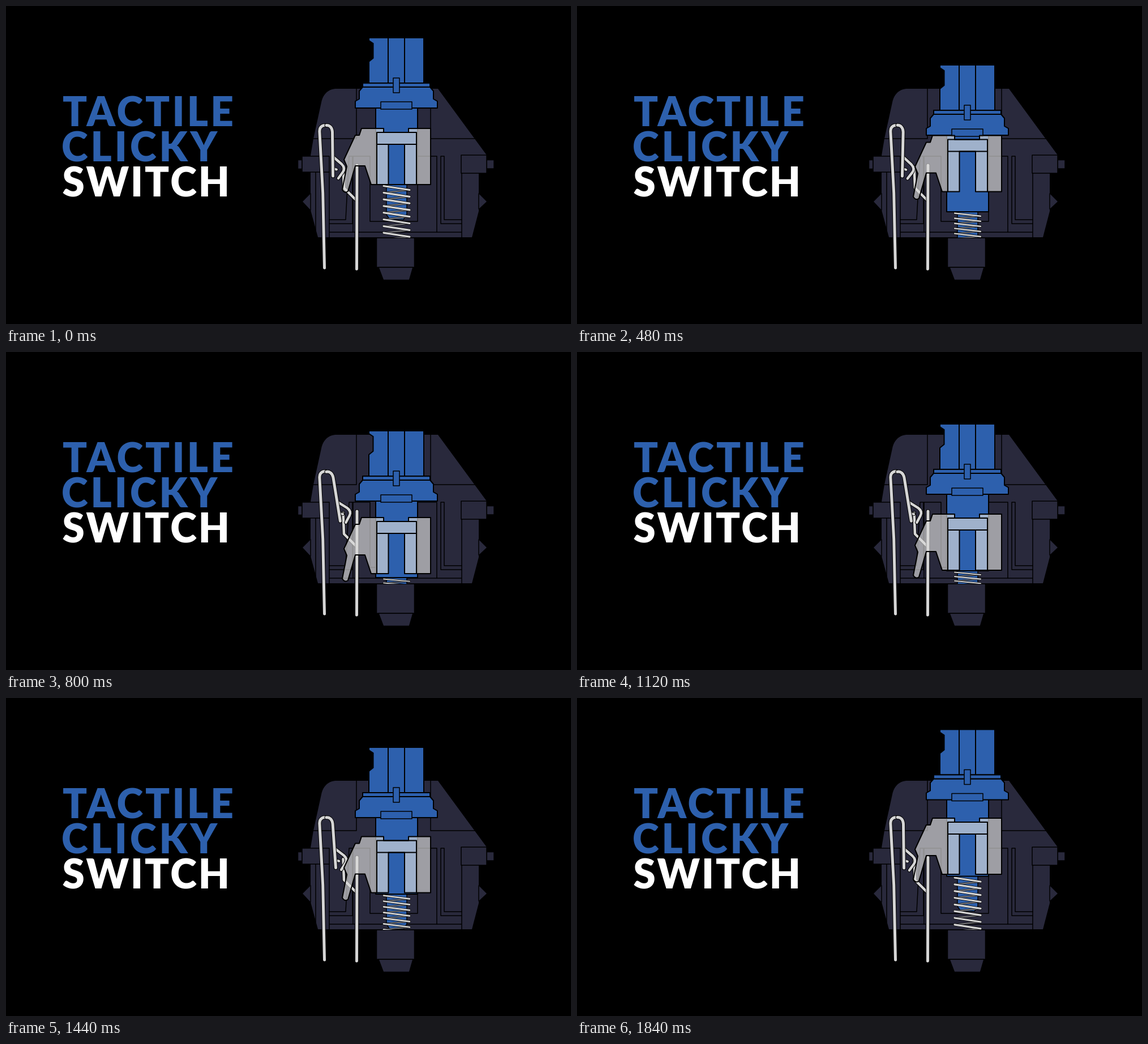
Write an HTML page with a canvas that moves like this. It is 998x561 px and loops after 1920 ms.

```html
<!DOCTYPE html>
<html lang="en">
<head>
<meta charset="utf-8">
<title>Tactile clicky switch</title>
<style>
html, body { margin: 0; width: 100%; height: 100%; overflow: hidden; background: #000; }
canvas, svg { position: absolute; left: 0; top: 0; width: 998px; height: 561px; }
text { font: 900 71px Lato, Inter, sans-serif; letter-spacing: 4.2px; fill: #2d60ad; }
.wide { letter-spacing: 5px; }
.light { fill: #fff; letter-spacing: 3px; }
</style>
</head>
<body>
<canvas id="stage" width="998" height="561"></canvas>
<svg viewBox="0 0 998 561">
  <text x="100" y="211.5">TACTILE</text>
  <text x="98" y="273.7" class="wide">CLICKY</text>
  <text x="99.5" y="336" class="light">SWITCH</text>
</svg>
<script>
const ctx = document.getElementById('stage').getContext('2d');
const LOOP = 1920, STEP = 80;
const NAVY = '#29293c', BLUE = '#2d60ad', STEEL = '#d6d6d6', SHADE = '#77777c';
const GLASS = 'rgba(219,219,219,.66)';

// [time, value] pairs
const stemKeys = [[0, 0], [80, 2.5], [240, 17], [480, 48], [560, 58], [800, 83], [900, 86],
  [1120, 71], [1440, 31], [1680, 6], [1840, -.5], [1920, 0]];
const sliderKeys = [[0, 0], [240, 2.5], [480, 12.5], [560, 18], [640, 30], [720, 82], [800, 76],
  [960, 78], [1120, 70], [1440, 28.5], [1680, 2], [1840, -4], [1920, 0]];
const leafKeys = [[0, 0], [240, 0], [480, -3], [640, -4], [720, 13], [1120, 13], [1280, 11],
  [1440, 5], [1600, 0], [1920, 0]];

function segment(keys, t) {
  let i = 0;
  while (i < keys.length - 2 && t >= keys[i + 1][0]) i++;
  return i;
}

function linear(keys, t) {
  const i = segment(keys, t), [a, u] = keys[i], [b, v] = keys[i + 1];
  return u + (v - u) * (t - a) / (b - a);
}

function smooth(keys, t) {
  const i = segment(keys, t), [a, u] = keys[i], [b, v] = keys[i + 1];
  const slope = k => {
    const p = keys[Math.max(k - 1, 0)], q = keys[Math.min(k + 1, keys.length - 1)];
    return (q[1] - p[1]) / (q[0] - p[0]);
  };
  const h = b - a, x = (t - a) / h, y = 1 - x;
  return y * y * (1 + 2 * x) * u + x * x * (3 - 2 * x) * v +
    h * x * y * (y * slope(i) - x * slope(i + 1));
}

function shape(d, fill, width = 2) {
  const path = new Path2D(d);
  if (fill) {
    ctx.fillStyle = fill;
    ctx.fill(path);
  }
  if (!width) return;
  ctx.strokeStyle = '#000';
  ctx.lineWidth = width;
  ctx.stroke(path);
}

function box(x1, y1, x2, y2, fill, width) {
  shape(`M${x1} ${y1}H${x2}V${y2}H${x1}Z`, fill, width);
}

function wire(d, width = 5, color = STEEL, edge = 2) {
  const path = new Path2D(d);
  for (const [style, w] of [['#000', width + edge], [color, width]]) {
    ctx.strokeStyle = style;
    ctx.lineWidth = w;
    ctx.stroke(path);
  }
}

function shifted(dy, draw) {
  ctx.save();
  ctx.translate(0, dy);
  draw();
  ctx.restore();
}

function housing() {
  shape('M584 146H763L849 263L835 295V331L849 345L835 358V362L823 408H551L538 360' +
    'L524 345L538 331V264L543 234L557 170C560 156 569 146 584 146Z', NAVY, 0);
  shape('M619 146V234H543M750 146V234H829M538 331V360M835 331V358', null, 1.5);
  shape('M613 399V265H643V380H727V265H761V399', null, 1.5);
  shape('M571 384H612V265H606L600 377H571M805 384H768V265H774V377H805', null, 1.5);
  shape('M547 293V408M571 293V408M805 295V408M571 399H805', null, 1.5);
  box(515.5, 271.5, 523, 287.5, NAVY, 1.5);
  box(849, 271.5, 862, 287, NAVY, 1.5);
  box(523, 265, 571, 293, NAVY, 1.5);
  box(804, 263, 849, 295, NAVY, 1.5);
  box(654.5, 409, 721.5, 461, NAVY, 1.5);
  shape('M658 461H719L712.5 483.5H666.5Z', NAVY, 1.5);
}

function contacts(bend) {
  wire('M595.5 284L597 321L620 344', 4.5);
  wire('M620 281L619.5 464');
  wire('M562.5 462L559.7 330L554 224C553 215 557 210.5 564 210.5');
  ctx.save();
  ctx.translate(572, 212);
  ctx.rotate(-bend / 88);
  ctx.translate(-572, -212);
  wire('M579 287L584 288.5', 4);
  wire('M579 267L593 279Q600 286 595 293L587 304', 4.5);
  wire('M566 210.5C572 210 576 215 576.5 222L577.5 300');
  ctx.restore();
}

// the lower coils disappear into the socket
function coils(drop) {
  const squeeze = 1 - drop / 200, pitch = 11.8 * squeeze, rise = 7 * squeeze;
  const width = 3.2 * squeeze;
  const starts = [];
  for (let y = 317.5 + drop; y < 410; y += pitch) starts.push(y);
  for (const y of starts) wire(`M713 ${y + rise}L667 ${y + pitch}`, width * .7, SHADE, 1);
  for (const y of starts) wire(`M667 ${y}L713 ${y + rise}`, width, STEEL, 1.4);
}

function spring(drop) {
  ctx.save();
  ctx.beginPath();
  ctx.rect(640, 300, 100, 109);
  ctx.clip();
  shifted(drop, () => shape('M672 314H708V368L702 377H678L672 368Z', BLUE, 1.5));
  coils(drop);
  ctx.restore();
}

function stem() {
  box(653, 178, 727, 315, BLUE);
  shape('M641 56H738V136H641V98L648.5 92V66L641 61Z', BLUE);
  shape('M675 57V136M704 57V136');
  shape('M630 143H749L755 150V164L762 168V180H617V168L624 164V150Z', BLUE);
  box(630, 136, 749, 143, BLUE);
  box(684, 127, 695, 153, BLUE, 1.5);
  box(662, 169, 717, 182, BLUE, 1.5);
}

function slider() {
  shape('M628 216H667V223H711V216H750V315H704V244H675.5V315H645L634 282H617L604 327' +
    'Q598 331 594 324L602 283L597 271L617 228H624Z', GLASS);
  shape('M655 315V223H725V315M655 244H725');
}

function draw(t) {
  const drop = smooth(stemKeys, t);
  ctx.fillStyle = '#000';
  ctx.fillRect(0, 0, 998, 561);
  ctx.lineCap = ctx.lineJoin = 'round';
  housing();
  contacts(linear(leafKeys, t));
  spring(drop);
  shifted(drop, stem);
  shifted(linear(sliderKeys, t), slider);
}

const start = performance.now();
function tick() {
  const t = (performance.now() - start) % LOOP;
  draw(Math.floor(t / STEP) * STEP);
  requestAnimationFrame(tick);
}
tick();
</script>
</body>
</html>
```
